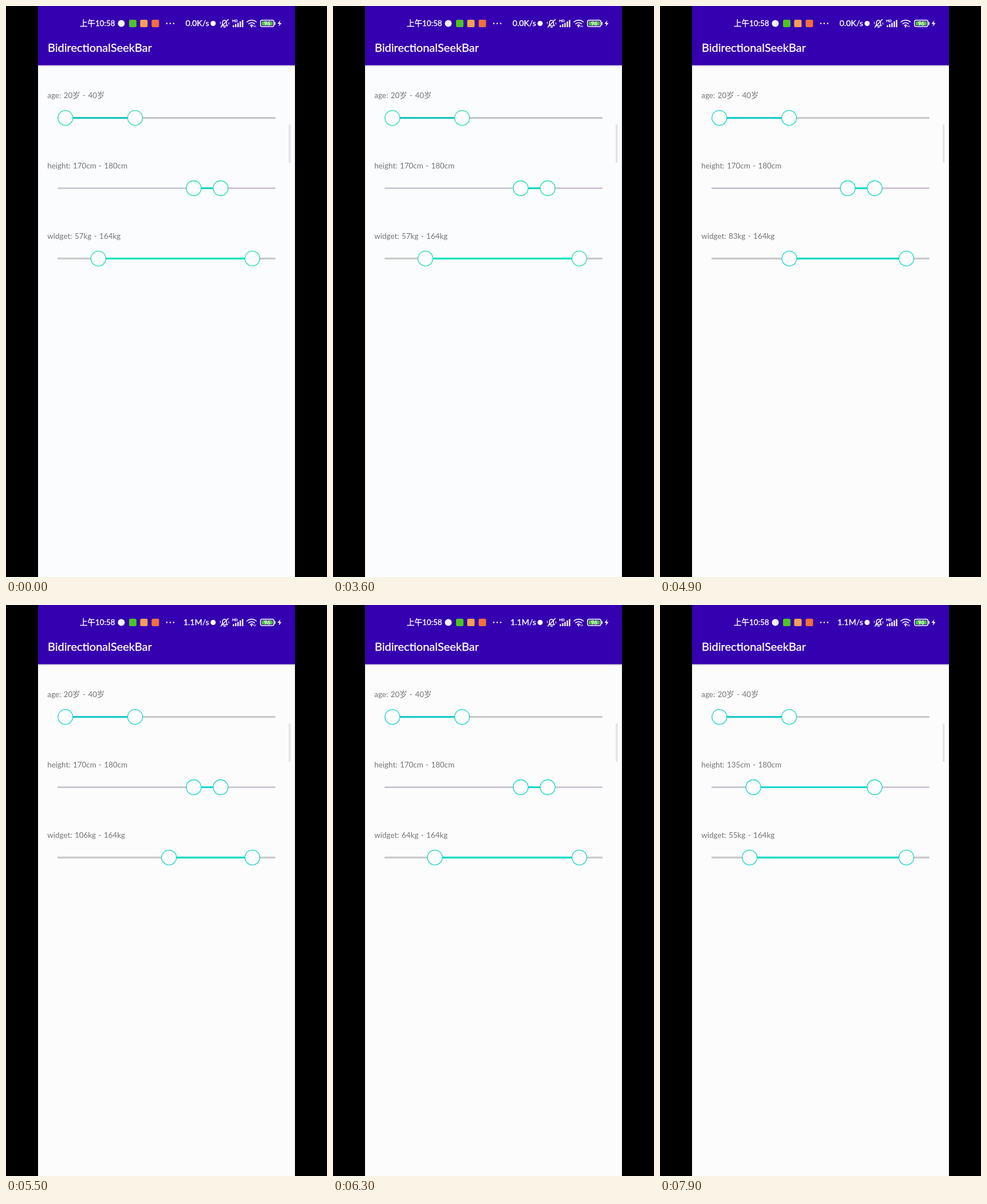
An HTML page that plays this animation: 561x998 px, repeating every 8000 ms.

```html
<!DOCTYPE html>
<html lang="en">
<head>
<meta charset="utf-8">
<title>Range sliders</title>
<style>
  html, body { margin: 0; width: 100%; height: 100%; overflow: hidden; background: #000; }
  svg { display: block; width: 561px; height: 998px; }
  text { font-family: Lato, "Noto Sans CJK SC", "Noto Sans CJK", "Noto Sans", sans-serif; }
  .label { font-size: 13.4px; word-spacing: 1px; fill: #747474; }
  .bar text { fill: #fff; stroke: #fff; stroke-width: .35px; }
  .line { fill: none; stroke: #fff; stroke-width: 1.5; stroke-linecap: round; stroke-linejoin: round; }
</style>
</head>
<body>
<svg id="stage" viewBox="0 0 561 998">
  <defs>
    <linearGradient id="shade" x2="0" y2="1">
      <stop stop-color="#bdb6cc"/>
      <stop offset="1" stop-color="#fcfcfc" stop-opacity="0"/>
    </linearGradient>
  </defs>
  <rect width="561" height="998"/>
  <rect id="page" x="56" width="449" height="998"/>
  <rect x="56" y="103" width="449" height="5" fill="url(#shade)"/>
  <rect x="56" width="449" height="103.5" fill="#3500b0"/>
  <rect id="scroll" x="494" y="207" width="3.4" height="67" rx="1"/>

  <g class="bar">
    <text x="73" y="80" font-size="20">BidirectionalSeekBar</text>
    <text x="129" y="35.3" font-size="13.5">上午10:58</text>
    <text id="speed" x="355" y="35.3" font-size="14.2" text-anchor="end"></text>
    <circle cx="201.500" cy="30.500" r="6" fill="#f4f1fb"/>
    <rect x="215" y="24" width="13" height="13" rx="2.500" fill="#4cc522"/>
    <rect x="234.500" y="24" width="13" height="13" rx="2.500" fill="#f3a054"/>
    <rect x="254.500" y="24" width="13" height="13" rx="2.500" fill="#f2703c"/>
    <g fill="#fff">
      <circle cx="281" cy="30.500" r="1.300"/>
      <circle cx="287" cy="30.500" r="1.300"/>
      <circle cx="293" cy="30.500" r="1.300"/>
      <circle cx="362" cy="30.500" r="4.500"/>
    </g>
    <!-- muted bell -->
    <g class="line">
      <path d="M377 34.500h10l-1.500-2.300v-3.700a3.600 3.600 0 0 0-7.200 0v3.700zM380.500 37h3M388.500 23.500l-13 13.500"/>
      <path d="M374.500 28v3M389.500 29v3" stroke-width="1"/>
    </g>
    <text x="395" y="28" font-size="6.500">HD</text>
    <path d="M397.500 37v-3.500M401.500 37v-5.500M405.500 37v-7.500M409.500 37v-10M413.500 37v-12.500" stroke="#fff" stroke-width="2.300"/>
    <!-- wifi -->
    <g class="line" stroke-width="2">
      <path d="M421 28a12 12 0 0 1 16.500 0M424 31.300a7.500 7.500 0 0 1 10.500 0M427 34.200a3.300 3.300 0 0 1 4.500 0"/>
    </g>
    <circle cx="429.200" cy="36" r="1.400" fill="#fff"/>
    <path d="M433.500 37v-3M436 34v3" stroke="#fff"/>
    <!-- battery -->
    <rect x="444.700" y="24.700" width="23.600" height="11.300" rx="3" class="line" stroke-width="1.200"/>
    <rect x="446.700" y="26.700" width="19.600" height="7.300" rx="1.500" fill="#4fbd43"/>
    <path d="M470.200 28.500v4" class="line"/>
    <text x="456.500" y="33.700" font-size="9" text-anchor="middle">96</text>
    <path d="M479.500 25l-5 6h3.300l-1.300 5 5-6.300h-3.300z" fill="#fff"/>
  </g>
</svg>
<script>
const LOOP = 8000, STEP = 100, SETTLE = 4400, SPEED_AT = 5000;
const stage = document.getElementById("stage");
const page = document.getElementById("page");
const scroll = document.getElementById("scroll");
const speed = document.getElementById("speed");

// Value over time: [ms, value], eased between neighbours.
const weightPath = [[4320, 57], [5450, 106.3], [6610, 55.1]];
const heightPath = [[7120, 170], [8100, 131.1]];

function valueAt(path, t) {
  let [t0, v0] = path[0];
  if (t <= t0) return v0;
  for (const [t1, v1] of path.slice(1)) {
    if (t < t1) return v0 + (v1 - v0) * (1 - Math.cos(Math.PI * (t - t0) / (t1 - t0))) / 2;
    [t0, v0] = [t1, v1];
  }
  return v0;
}

function add(tag, attrs) {
  const el = document.createElementNS("http://www.w3.org/2000/svg", tag);
  set(el, attrs);
  stage.append(el);
  return el;
}

function set(el, attrs) {
  for (const key in attrs) el.setAttribute(key, attrs[key]);
}

function makeSlider({ name, unit, y, base, scale, colors }) {
  const place = v => base + v * scale;
  const label = add("text", { class: "label", x: 72.3, y: y - 34.7 });
  const rail = x => add("rect", { x, y: y - 1.6, width: 471 - x, height: 3.2, rx: 1 });
  const left = rail(90), right = rail(300), active = rail(90);
  const thumbs = [0, 1].map(() => add("circle", { cy: y, r: 13, "stroke-width": 1.3 }));
  return (low, high, late) => {
    const [a, b] = [place(low), place(high)];
    const [c0, c1, c2] = colors[late];
    label.textContent = `${name}: ${Math.round(low)}${unit} - ${Math.round(high)}${unit}`;
    set(left, { fill: c0, width: a - 90 });
    set(right, { fill: c2, x: b, width: 471 - b });
    set(active, { fill: c1, x: a, width: b - a });
    thumbs.forEach((thumb, i) => set(thumb, {
      cx: i ? b : a,
      fill: late ? "#fdfdfd" : "#fdfdff",
      stroke: late ? "#14d6c4" : "#1cdcae"
    }));
  };
}

const age = makeSlider({
  name: "age", unit: "岁", y: 195.6, base: -18, scale: 6.09,
  colors: [["#c6c6c6", "#18c2bc", "#c4c6c4"], ["#c8c8c8", "#16cbc6", "#c8cac8"]]
});
const tall = makeSlider({
  name: "height", unit: "cm", y: 318.5, base: -472.3, scale: 4.708,
  colors: [["#cbcbd8", "#08d3bf", "#cfc4d8"], ["#c6c7d1", "#08d7cb", "#d0c8d4"]]
});
const weight = makeSlider({
  name: "widget", unit: "kg", y: 441.3, base: 18.1, scale: 2.515,
  colors: [["#c9cac9", "#08e2c0", "#c8c9c6"], ["#c8c8c8", "#08d9c2", "#c8c9c9"]]
});

function draw(now) {
  const t = Math.floor(now % LOOP / STEP) * STEP;
  const late = t >= SETTLE ? 1 : 0;
  set(page, { fill: late ? "#fcfcfc" : "#fbfcfe" });
  set(scroll, { fill: late ? "#e3e3e3" : "#e6dfe8" });
  speed.textContent = t < SPEED_AT ? "0.0K/s" : "1.1M/s";
  age(20, 40, late);
  tall(valueAt(heightPath, t), 180, late);
  weight(valueAt(weightPath, t), 164, late);
}

let start;
function tick(now) {
  start ??= now;
  draw(Math.max(0, now - start));
  requestAnimationFrame(tick);
}
draw(0);
requestAnimationFrame(tick);
</script>
</body>
</html>
```
